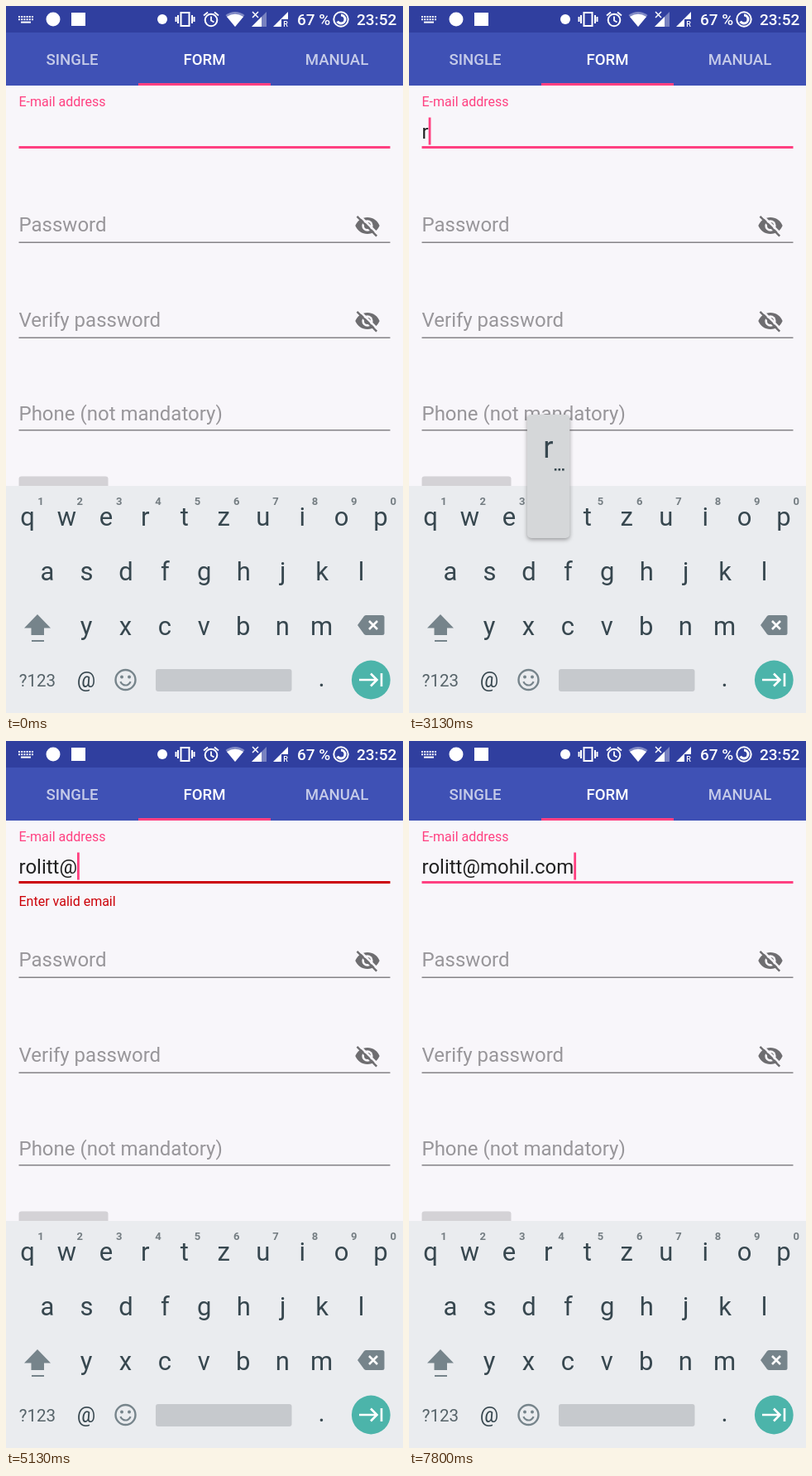
Animation of 480x853 px, one loop 8000 ms. Source, as an HTML page with a canvas:

```html
<!DOCTYPE html>
<html lang="en">
<head>
<meta charset="utf-8">
<title>Form validation</title>
<style>
  html, body { margin: 0; width: 100%; height: 100%; overflow: hidden; background: #f8f6fa; }
  canvas { display: block; width: 480px; height: 853px; }
</style>
</head>
<body>
<canvas id="stage" width="480" height="853"></canvas>
<script>
const g = document.getElementById('stage').getContext('2d');
const LOOP = 8000, HOLD = 65, POPUP = 197;
const BG = '#f8f6fa', PINK = '#ff4081', RED = '#cc0008', HINT = '#98969a',
      KEY = '#37474f', GREY = '#76848b', WHITE = '#fff';

const email = 'rolitt@mohil.com';
const presses = [3000, 3330, 3670, 4070, 4235, 4400, 4930, 5400,
                 5600, 5800, 6000, 6470, 6800, 7070, 7330, 7600];
const errorFrom = 5065, errorTo = presses[14] + HOLD;
const hasMore = 'qwertzuiopascn.';

// Key positions: letter centre and baseline, popup top and popup baseline
const keys = {};
function addRow(chars, x, base, top, popBase) {
  [...chars].forEach((c, i) => { keys[c] = { x: x + 47.45 * i, base, top, popBase, size: 31 }; });
}
addRow('qwertzuiop', 26, 627, 493, 545);
addRow('asdfghjkl', 50, 693, 567, 616);
addRow('yxcvbnm', 97, 759, 633, 682);
addRow('@', 97, 822, 700, 748);
addRow('.', 381.5, 821, 700, 748);
keys['@'].size = 25;

function text(s, x, y, size, color, align = 'left', weight = 400) {
  g.font = `${weight} ${size}px Roboto, sans-serif`;
  g.textAlign = align;
  g.fillStyle = color;
  g.fillText(s, x, y);
}
function rect(x, y, w, h, color, r = 0) {
  g.fillStyle = color;
  g.beginPath();
  g.roundRect(x, y, w, h, r);
  g.fill();
}
function disc(x, y, r, color) {
  g.fillStyle = color;
  g.beginPath();
  g.arc(x, y, r, 0, 7);
  g.fill();
}
function ring(x, y, r, width, color, from = 0, to = 7) {
  g.strokeStyle = color;
  g.lineWidth = width;
  g.beginPath();
  g.arc(x, y, r, from, to);
  g.stroke();
}
const fill = (d, color) => { g.fillStyle = color; g.fill(new Path2D(d)); };
function stroke(d, width, color) {
  g.strokeStyle = color;
  g.lineWidth = width;
  g.stroke(new Path2D(d));
}

function statusBar() {
  rect(0, 0, 480, 32, '#303f9f');
  for (let row = 0; row < 2; row++)
    for (let i = 0; i < 6; i++) rect(15 + i * 3.2, 12 + row * 3.2, 2, 2, WHITE);
  rect(18, 18.6, 12, 2, WHITE);
  disc(57, 16, 8.5, WHITE);
  rect(79, 8, 17, 16, WHITE);
  disc(189, 16, 6, WHITE);

  // Vibrate, alarm
  stroke('M211.5 8H221.5V24H211.5ZM208 11V21M225 11V21M205.500 13V19M227.500 13V19', 2, WHITE);
  ring(248, 17, 7.3, 2, WHITE);
  stroke('M248 12.500V17.500L251.500 19.500M239 11.500L244 7.500M257 11.500L252 7.500', 1.8, WHITE);

  // Wi-Fi and signal strength
  fill('M277 25L265.500 11Q277 3 288.500 11Z', 'rgba(255,255,255,.4)');
  fill('M277 25L267 13Q277 6.500 287 13Z', WHITE);
  fill('M297 25H315V7Z', 'rgba(255,255,255,.35)');
  fill('M297 25H309V13Z', WHITE);
  stroke('M298 7L305 14M305 7L298 14', 1.5, WHITE);
  fill('M323 25L341 7V16H333V25Z', WHITE);
  text('R', 338, 25, 9, WHITE, 'center', 500);

  text('67 %', 352, 23, 19, WHITE, 'left', 500);
  ring(405, 16, 8.7, 2, WHITE);
  ring(405, 16, 5, 3, WHITE, -1.57, 2.6);
  text('23:52', 424, 23, 19, WHITE, 'left', 500);
}

function tabs() {
  rect(0, 32, 480, 64, '#3f51b5');
  const dim = 'rgba(255,255,255,.7)';
  text('SINGLE', 80, 71, 18.6, dim, 'center', 500);
  text('FORM', 240, 71, 18.6, WHITE, 'center', 500);
  text('MANUAL', 400, 71, 18.6, dim, 'center', 500);
  rect(160, 93, 160, 3, PINK);
}

function hiddenEye(x, y) {
  g.save();
  g.translate(x, y);
  g.scale(1.333, 1.333);
  fill('M-11 0C-9.300-4.400-5-7.500 0-7.500S9.300-4.400 11 0C9.300 4.400 5 7.500 0 7.500S-9.300 4.400-11 0Z', '#6e6d70');
  disc(0, 0, 5, BG);
  disc(0, 0, 3, '#6e6d70');
  stroke('M-7.700-9.700L10 8', 2, BG);
  stroke('M-9.400-8.400L8.400 9.400', 1.8, '#6e6d70');
  g.restore();
}

function form(t, typed) {
  const failed = t >= errorFrom && t < errorTo;
  text('E-mail address', 15.5, 121, 16, PINK);
  text(typed, 15.5, 160, 24, '#212121');
  const end = 15.5 + g.measureText(typed).width;
  const blink = (t + 870) % 1000 < 470;
  if (typed || blink) rect(end, 134.5, 2.8, 33, PINK);
  rect(15.5, 169, 449, 3, failed ? RED : PINK);
  if (failed) text('Enter valid email', 15.5, 199, 16, RED);

  [['Password', 272, 285], ['Verify password', 387, 400], ['Phone (not mandatory)', 500, 511.5]]
    .forEach(([label, base, line], i) => {
      text(label, 15.5, base, 24, HINT);
      rect(15.5, line - 0.5, 449, 1.5, '#858387');
      if (i < 2) hiddenEye(437, base - 7);
    });
  rect(15.5, 567.5, 108, 20, '#d4d2d6', 3);
}

function keyboard() {
  rect(0, 579, 480, 274, '#eaecef');
  for (const c in keys) text(c, keys[c].x, keys[c].base, keys[c].size, KEY, 'center');
  for (let i = 0; i < 10; i++)
    text((i + 1) % 10, 42 + 47.35 * i, 601.5, 13, '#747d82', 'center', 700);

  // Shift and backspace
  fill('M38 734L54 750.500H46V759H30.500V750.500H22Z', GREY);
  rect(31, 765, 15, 2, GREY);
  fill('M425 747L433 736Q434 735 435.500 735H455Q457.500 735 457.500 737.500V756.500Q457.500 759 455 759H435.500Q434 759 433 758Z', GREY);
  stroke('M439 742L449 752M449 742L439 752', 2.6, WHITE);

  // Bottom row
  text('?123', 38, 821, 20.5, '#566369', 'center');
  ring(144.5, 813, 12, 2.4, GREY);
  disc(140, 809.5, 2, GREY);
  disc(149, 809.5, 2, GREY);
  ring(144.5, 813, 6.5, 2.2, GREY, 0.35, 2.8);
  rect(181, 800, 164.5, 27, '#c6c9cd', 3);
  disc(441.3, 813, 23.4, '#4cb4aa');
  stroke('M427 813H448M441 805.500L448.500 813L441 820.500M454 805V821', 2.6, WHITE);
}

function popup(c) {
  const k = keys[c];
  g.save();
  g.shadowColor = 'rgba(0,0,0,.35)';
  g.shadowBlur = 5;
  g.shadowOffsetY = 2;
  rect(k.x - 25.5, k.top, 51.5, k.base + 15 - k.top, '#d5d7d9', 5);
  g.restore();
  text(c, k.x, k.popBase, c === '@' ? 30 : 36, KEY, 'center');
  if (hasMore.includes(c))
    for (let i = 0; i < 3; i++) rect(k.x + 7.5 + i * 4.6, k.popBase + 13, 2.6, 2.6, KEY);
}

function draw(t) {
  const typed = email.slice(0, presses.filter(p => t >= p + HOLD).length);
  rect(0, 0, 480, 853, BG);
  form(t, typed);
  statusBar();
  tabs();
  keyboard();
  presses.forEach((p, i) => { if (t >= p && t < p + POPUP) popup(email[i]); });
}

const start = performance.now();
function tick() {
  draw((performance.now() - start) % LOOP);
  requestAnimationFrame(tick);
}
tick();
</script>
</body>
</html>
```
